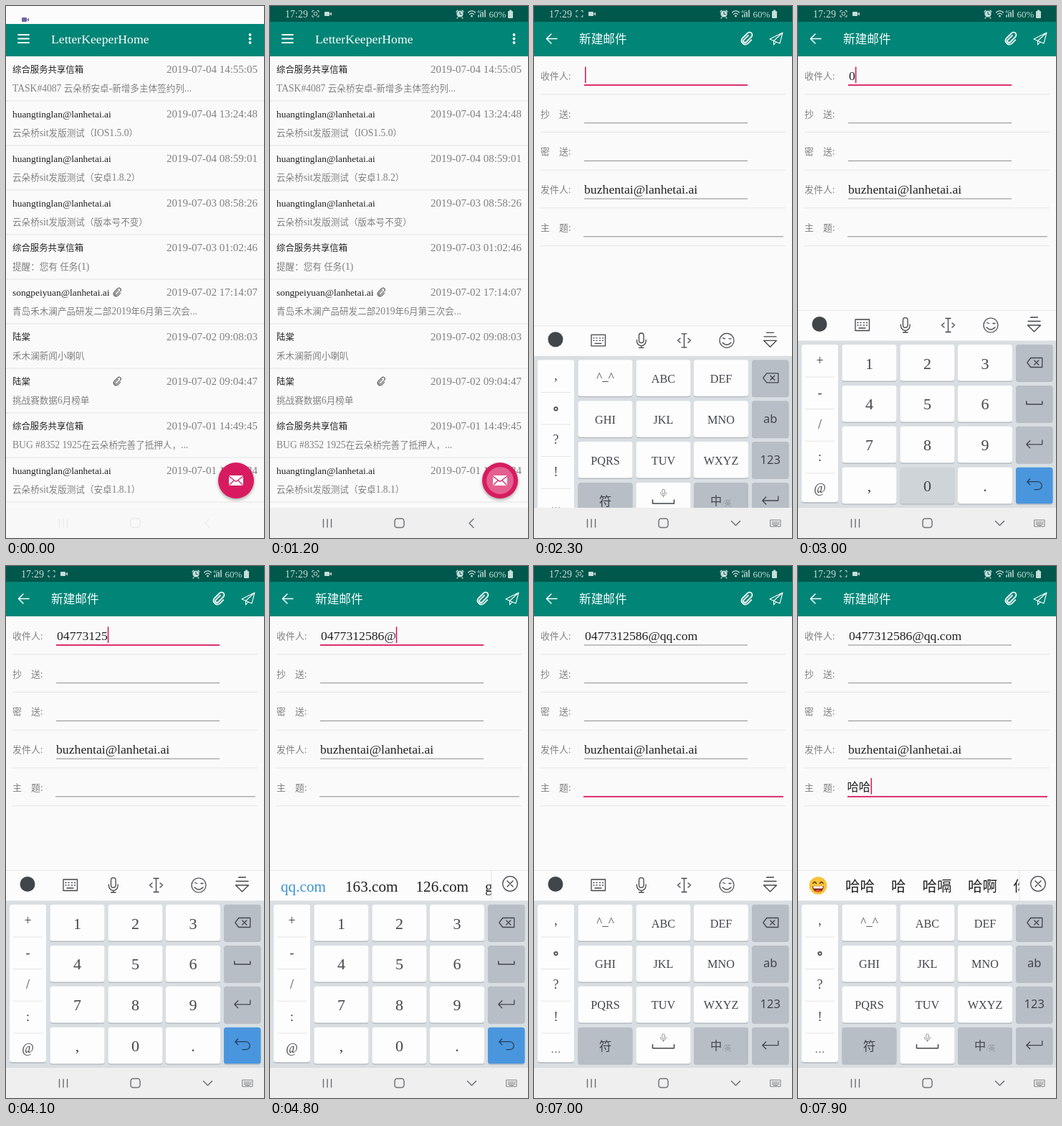
An HTML page that plays this animation: 360x740 px, repeating every 8 s.

```html
<!DOCTYPE html>
<html lang="zh">
<head>
<meta charset="utf-8">
<title>Mail</title>
<style>
html, body { margin: 0; height: 100%; overflow: hidden; background: #fafafa }
svg { display: block; width: 100vw; height: 100vh; font: 300 14px 'Liberation Serif', 'Noto Sans CJK SC', 'Noto Sans CJK', serif; white-space: pre }
.sans { font-family: 'Noto Sans', 'Noto Sans CJK SC', sans-serif }
.fab { filter: drop-shadow(0 2px 2px #0005) }
</style>
</head>
<body>
<svg id="stage" viewBox="0 0 360 740"></svg>
<script>
const LOOP = 8000;
const PAPER = '#fafafa', GREEN = '#008577', DARK = '#00574b', PINK = '#d81b60',
  INK = '#222', GREY = '#808080', RULE = '#8c8c8c', HAIR = '#e2e6e6',
  ICON = '#41464b', KEY = '#fdfdfd', SOFT = '#b8bec5', PALE = '#f8fdfc';

const SENDER = 'huangtinglan@lanhetai.ai', SHARED = '综合服务共享信箱';
const MAILS = [
  [SHARED, '2019-07-04 14:55:05', 'TASK#4087 云朵桥安卓-新增多主体签约列...'],
  [SENDER, '2019-07-04 13:24:48', '云朵桥sit发版测试（IOS1.5.0）'],
  [SENDER, '2019-07-04 08:59:01', '云朵桥sit发版测试（安卓1.8.2）'],
  [SENDER, '2019-07-03 08:58:26', '云朵桥sit发版测试（版本号不变）'],
  [SHARED, '2019-07-03 01:02:46', '提醒：您有 任务(1)'],
  ['songpeiyuan@lanhetai.ai', '2019-07-02 17:14:07', '青岛禾木澜产品研发二部2019年6月第三次会...', 1],
  ['陆棠', '2019-07-02 09:08:03', '禾木澜新闻小喇叭'],
  ['陆棠', '2019-07-02 09:04:47', '挑战赛数据6月榜单', 1],
  [SHARED, '2019-07-01 14:49:45', 'BUG #8352 1925在云朵桥完善了抵押人，...'],
  [SENDER, '2019-07-01 13:22:34', '云朵桥sit发版测试（安卓1.8.1）']
];

// times in ms
const FOCUS_AT = 2000, NUMERIC_AT = 2700, AT_SIGN = 4600, BAR_AT = 4700, PICK_AT = 5550,
  SUBJECT_AT = 6050, LETTERS_AT = 6550, WORDS_AT = 7250, WORD_AT = 7550;
// [time, key]: each press adds its text to the address field
const TYPED = [...[...'0477312586'].map((k, i) => [2950 + 150 * i, k]), [AT_SIGN, '@'], [PICK_AT, 'qq.com']];
const PRESSES = [...TYPED, [NUMERIC_AT - 90, '123'], [LETTERS_AT - 90, 'undo'], [7050, 'GHI'], [7180, 'ABC']];

const ramp = (t, a, b) => Math.min(1, Math.max(0, (t - a) / (b - a)));
const ease = x => 1 - (1 - x) ** 3;
const pen = document.createElement('canvas').getContext('2d');
const widthOf = s => {
  pen.font = "17.7px 'Liberation Serif', serif";
  return pen.measureText(s).width;
};

const rect = (x, y, w, h, fill, r = 0) => `<rect x="${x}" y="${y}" width="${w}" height="${h}" rx="${r}" fill="${fill}"/>`;
const line = (d, color, w = 1.3) => `<path d="${d}" fill="none" stroke="${color}" stroke-width="${w}" stroke-linecap="round" stroke-linejoin="round"/>`;
const fill = (d, color) => `<path d="${d}" fill="${color}"/>`;
const dot = (x, y, r, color) => `<circle cx="${x}" cy="${y}" r="${r}" fill="${color}"/>`;
const ring = (x, y, r, color, w = 1.2) => `<circle cx="${x}" cy="${y}" r="${r}" fill="none" stroke="${color}" stroke-width="${w}"/>`;
const at = (x, y, s, scale = 1) => `<g transform="translate(${x} ${y}) scale(${scale})">${s}</g>`;
const fade = (o, s) => o > 0 ? `<g opacity="${o}">${s}</g>` : '';

// Chinese runs are set a little smaller than Latin ones
const text = (x, y, size, color, s, anchor = 'start', cls = '') =>
  `<text x="${x}" y="${y}" font-size="${size}" fill="${color}" text-anchor="${anchor}" class="${cls}">` +
  s.replace(/[\u2e80-\uffef]+/g, m => `<tspan font-size="${size * .925}">${m}</tspan>`) + '</text>';

const clip = (x, y, scale, color) =>
  at(x, y, line('M3-4l-6 6a2 2 0 0 0 3 3l7-7a3.5 3.5 0 0 0-5-5l-7 7a5 5 0 0 0 7 7l5-5', color, 1.7), scale);
const camera = (x, y, color) => rect(x, y, 7, 6, color, 1) + fill(`M${x + 7} ${y + 3}l3-2.5v5z`, color);

function statusBar(t) {
  const c = '#c5dcd8', on = Math.floor((t + 200) / 1000) % 2;
  return rect(0, 0, 360, 22, DARK) + rect(0, 22, 360, 4, GREEN) +
    text(21, 16, 14, c, '17:29') +
    line('M59 8.5v-2h2M66 6.5h2v2M68 13v2h-2M61 15h-2v-2', c, 1) + (on ? ring(63.5, 10.8, 2.4, c, 1) : '') +
    camera(76, 8, c) +
    dot(265, 11, 4.6, c) + line('M265 8.5v3h2', DARK, 1) + line('M260 8l2-2M270 8l-2-2M262 16l-1 1M268 16l1 1', c, 1.2) +
    line('M276.5 9a7 7 0 0 1 10 0M278.5 11.5a4.5 4.5 0 0 1 6 0', c, 1.2) + dot(281.5, 14, 1.4, c) +
    text(289, 10, 6, c, '4G', 'start', 'sans') + line('M291 15v-2M294 15v-4M297 15V9M300 15V6', c, 1.5) +
    text(305.5, 16, 13, c, '60%') + rect(332, 7, 7, 10, c, 1) + rect(334, 5.5, 3, 2, c);
}

function navBar(keys) {
  const c = '#70757a';
  return rect(0, 698, 360, 42, '#efefef') +
    line('M74.5 714v11M80 714v11M85.5 714v11', c, 1.5) +
    `<rect x="174" y="713" width="13" height="12.5" rx="3.5" fill="none" stroke="${c}" stroke-width="1.5"/>` +
    (keys ? line('M275.5 716.5l6 6 6-6', c, 1.6) +
      line('M330 715h14v9h-14z', c, .9) + line('M332 718h10M332 720.5h10', c, 1.1) + line('M334 722.5h6', c, .9)
      : line('M284 713.5l-6 6 6 6', c, 1.5));
}

function listPage(t) {
  let s = rect(0, 0, 360, 740, PAPER) + rect(0, 25, 360, 45, GREEN);
  s += line('M17 40h15M17 45.5h15M17 51h15', PALE, 1.8) + text(63, 52, 17.7, PALE, 'LetterKeeperHome');
  for (const y of [40, 45.5, 51]) s += dot(340.5, y, 1.9, PALE);
  MAILS.forEach(([from, date, subject, file], i) => {
    const y = 70 + 62 * i;
    s += text(9, y + 22.5, 13.4, INK, from) + text(351, y + 23, 15, GREY, date, 'end') +
      text(9, y + 49, 13.6, GREY, subject) + rect(0, y + 61.5, 360, 1, HAIR);
    if (file) s += clip(154.5, y + 18, .72, '#666');
  });
  const press = ramp(t, 1050, 1250);
  return s + `<g class="fab">${dot(321, 660, 25, PINK)}</g>` +
    fade(press && .3, dot(321, 660, 25 * press, '#fff')) +
    rect(311, 653, 20, 14, '#fff', 1.5) + line('M311.5 654.5l9.5 7 9.5-7M312 666l6-6M330 666l-6-6', PINK, 1.2);
}

function caret(t, x, y, since) {
  return (t - since) % 1000 < 500 ? rect(x, y, 1.6, 22.5, PINK) : '';
}

function writePage(t) {
  let s = rect(0, 22, 360, 718, PAPER) + rect(0, 22, 360, 48, GREEN) +
    line('M32 45.5H17.5M24 39l-6.5 6.5 6.5 6.5', PALE, 1.6) + text(63, 51.5, 18, PALE, '新建邮件') +
    clip(296, 45, 1.05, PALE) + line('M347 37l-18 9 5.5 2.5zM347 37l-4 15-8.5-3.5zM334.5 48.5v5.5l3.5-4', PALE, 1.1);
  const focus = t < FOCUS_AT ? -1 : t < SUBJECT_AT ? 0 : 4;
  ['收件人:', '抄　送:', '密　送:', '发件人:', '主　题:'].forEach((label, i) => {
    const y = 70 + 52.7 * i, wide = i == 4, x = wide ? 69 : 70, w = wide ? 279 : 228, hot = i == focus;
    s += text(9, y + 32, 14, GREY, label) + rect(9, y + 52.3, 342, 1, HAIR) +
      rect(x, y + 39.5 - hot * .4, w, hot ? 1.8 : 1, hot ? PINK : RULE);
  });
  s += rect(3, 500.5, 354, 1, RULE) + text(70, 260.5, 17.7, INK, 'buzhentai@lanhetai.ai');

  const done = TYPED.filter(([time]) => time <= t), address = done.map(k => k[1]).join('');
  s += text(71, 102.5, 17.7, INK, address);
  if (focus == 0) s += caret(t, 71 + widthOf(address), 84.5, done.length ? done.at(-1)[0] : FOCUS_AT);
  if (focus == 4) {
    const word = t >= WORD_AT;
    s += text(68.5, 313, 17.7, INK, word ? '哈哈' : '') + caret(t, word ? 101.5 : 69, 295, word ? WORD_AT : SUBJECT_AT);
  }
  return s;
}

function toolBar() {
  const c = ICON;
  return dot(30, 442.5, 10.5, c) +
    line('M80 436h19.5v15.5H80z', c) + line('M83 440.5h1M87 440.5h1M91.5 440.5h1M95.5 440.5h1M83 444h1M87 444h1M91.5 444h1M95.5 444h1M85 448h9', c) +
    line('M146.5 437a3.3 3.3 0 0 1 6.6 0v7a3.3 3.3 0 0 1-6.6 0zM143.5 443v2a6.3 6.3 0 0 0 12.6 0v-2M149.8 451.5v2.5M146.5 454h6.6', c) +
    line('M206 434.5h7M209.5 434.5v19M206 453.5h7M204 441l-3.5 3 3.5 3M215 441l3.5 3-3.5 3', c) +
    ring(269, 444, 10, c) + line('M263 447q6 6 12 0M263.5 440.5l3 1M272 441.5h3', c) +
    line('M324.5 433h10M321 438.5h17M320.5 444h18l-9 9z', c);
}

function emoji(x, y) {
  return at(x, y, dot(0, 0, 12.3, '#f8c23a') + line('M-7-3q2-4 4.5 0M2.5-3q2.5-4 4.5 0', '#5b3a14', 1.5) +
    fill('M-8 1H8Q7 9 0 9T-8 1z', '#7a2a1c') + fill('M-7 1H7L6 4H-6z', '#fff') + fill('M-4.5 7.5Q0 4 4.5 7.5Q0 10 -4.5 7.5z', '#e8533c'));
}

function wordBar(words, latin) {
  return `<svg x="0" y="423" width="309" height="42" viewBox="0 423 309 42">` +
    words.map(([x, s], i) => text(x, 453, latin ? 21.2 : 22.2, i || !latin ? INK : '#3b93d6', s)).join('') + '</svg>' +
    (latin ? '' : emoji(28, 444.5)) + rect(308.5, 424, 1, 41, '#e0e3e5') +
    ring(335, 442, 10.3, ICON) + line('M331 438l8 8M339 438l-8 8', ICON);
}

// icons are drawn around the middle of a key
const GLYPH = {
  del: line('M-10 0l5-6.5H11v13H-5zM0-3l6 6M6-3l-6 6', ICON),
  space: line('M-11-3v4H11v-4', ICON, 1.5),
  enter: line('M11-6v6H-11M-6-5l-5 5 5 5', ICON),
  undo: line('M-10-5H5a5.5 5.5 0 0 1 0 11H0M-6-9l-4 4 4 4', '#24405c'),
  mic: line('M-15-1v5H15v-5', ICON, 1.5) + line('M-1.8-14a1.8 1.8 0 0 1 3.6 0v3a1.8 1.8 0 0 1-3.6 0zM-4-11a4 4 0 0 0 8 0M0-7v2', '#8b9095', 1),
  lang: text(-7, 6, 17.5, ICON, '中', 'middle') + text(8, 7, 10, '#8b9097', '/英', 'middle'),
  face: text(0, 4, 17, ICON, '^_^', 'middle')
};
const NUMBERS = [['1', '2', '3', 'del'], ['4', '5', '6', 'space'], ['7', '8', '9', 'enter'], [',', '0', '.', 'undo']];
const LETTERS = [['face', 'ABC', 'DEF', 'del'], ['GHI', 'JKL', 'MNO', 'ab'], ['PQRS', 'TUV', 'WXYZ', '123'], ['符', 'mic', 'lang', 'enter']];
const COLS = [[61.5, 76], [142.5, 76], [223, 76], [304, 51.5]];

function keyboard(t) {
  const numeric = t >= NUMERIC_AT && t < LETTERS_AT;
  const down = k => PRESSES.some(([time, key]) => key == k && t >= time && t < time + 90);
  let s = rect(0, 423, 360, 43, '#fcfcfc') + rect(0, 465.5, 360, 233, '#d8dee2') + rect(0, 423, 360, 1, '#e6e9ea');
  s += t >= BAR_AT && t < PICK_AT ? wordBar([[15, 'qq.com'], [105, '163.com'], [203.5, '126.com'], [300, 'gmail.com']], true)
    : t >= WORDS_AT ? wordBar([[66, '哈哈'], [130, '哈'], [173.5, '哈嗝'], [237, '哈啊'], [300.5, '你']])
    : toolBar();

  s += rect(5, 472, 51, 220, '#bcc2c7', 3) + rect(5, 471, 51, 219, KEY, 3);
  [...(numeric ? '+-/:@' : ',。?!…')].forEach((k, i) => {
    const y = 493.5 + 44.6 * i;
    if (down(k)) s += rect(5, y - 21, 51, 40, '#d5d9dc', 3);
    if (i) s += rect(10, y - 22.5, 41, 1, HAIR);
    s += k == '。' ? ring(30.5, y + 1, 2.2, ICON, 1.7) : text(30.5, y + 5.5, k == '…' ? 14 : 18, ICON, k, 'middle');
  });

  (numeric ? NUMBERS : LETTERS).forEach((row, r) => row.forEach((k, c) => {
    const [x, w] = COLS[c], y = 471 + 56.9 * r, mx = x + w / 2, my = y + 25;
    const soft = c == 3 || k == '符' || k == 'lang', sans = k == 'ab' || k == '123';
    const tone = k == 'undo' ? '#4a96de' : down(k) ? '#cfd4d8' : soft ? SOFT : KEY;
    const [size, drop] = numeric ? [22, 8.5] : sans ? [16.5, 5.5] : k == '符' ? [19, 7.5] : [16.2, 6.5];
    s += rect(x, y + 1.5, w, 50.5, '#b6bcc1', 3.5) + rect(x, y, w, 50.5, tone, 3.5);
    s += GLYPH[k] ? at(mx, my, GLYPH[k]) : text(mx, my + drop, size, ICON, k, 'middle', sans ? 'sans' : '');
  }));
  return s;
}

function scene(t) {
  const start = ramp(t, 50, 550), open = ease(ramp(t, 1250, 1700)), rise = ease(ramp(t, 2100, 2450));
  let s = open < 1 ? listPage(t) : '';
  if (open > 0) s += fade(open, at(0, 70 * (1 - open), writePage(t)));
  if (rise > 0) s += at(0, 276 * (1 - rise), keyboard(t));
  s += rect(0, 698, 360, 42, PAPER) + fade(.1 + .9 * start, navBar(rise > 0));
  if (start < 1) s += rect(0, 0, 360, 25, '#fcfcfc') + camera(22, 16, '#6f62a6');
  return s + fade(start, statusBar(t));
}

const stage = document.getElementById('stage');
let shown;
function tick(now) {
  const next = scene(now % LOOP);
  if (next != shown) stage.innerHTML = shown = next;
  requestAnimationFrame(tick);
}
tick(0);
</script>
</body>
</html>
```
